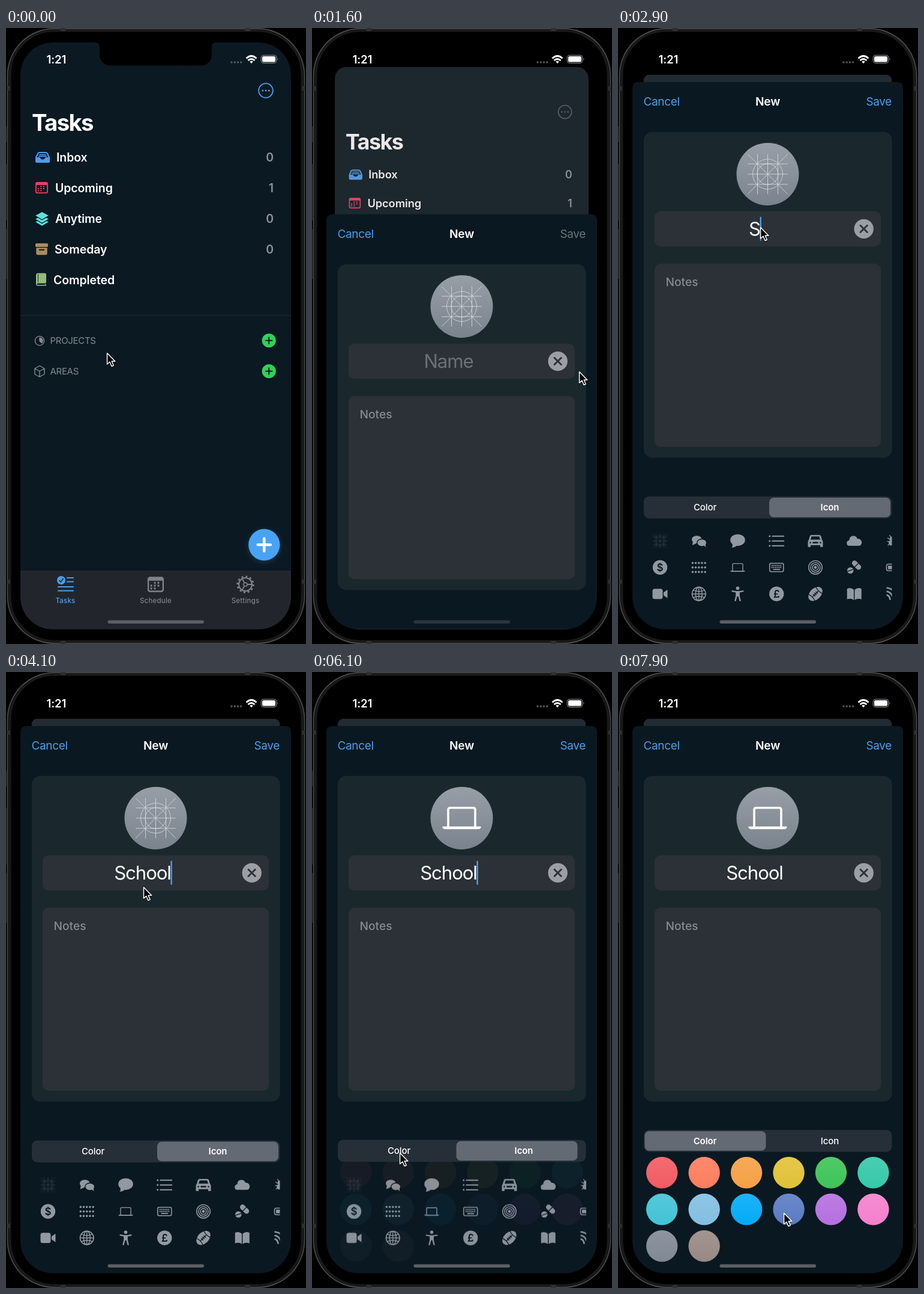
Animation of 500x1024 px, one loop 8 s. Source, as an HTML page:

```html
<!DOCTYPE html>
<html lang="en">
<head>
<meta charset="utf-8">
<title>New list</title>
<style>
html, body { margin: 0; width: 100%; height: 100%; overflow: hidden; background: #000; }
svg { display: block; width: 100vw; height: 100vh; }
text { font-family: Inter, "Open Sans", sans-serif; }
.row { font: 600 19.5px Inter, sans-serif; fill: #fff; letter-spacing: -.1px; }
.num { font: 600 19.5px Inter, sans-serif; fill: #8b9399; text-anchor: end; }
.cap { font: 400 15px Inter, sans-serif; fill: #858c91; letter-spacing: -.3px; }
.tab { font: 500 11.5px Inter, sans-serif; fill: #7d8185; text-anchor: middle; letter-spacing: .2px; }
.nav { font: 400 19px Inter, sans-serif; fill: #4a9fec; letter-spacing: -.35px; }
.name { font: 400 31.2px Inter, sans-serif; text-anchor: middle; letter-spacing: -1.1px; }
.seg { font: 500 15px Inter, sans-serif; fill: #fff; text-anchor: middle; letter-spacing: -.1px; }
.line { fill: none; stroke: currentColor; stroke-linecap: round; stroke-linejoin: round; }
</style>
</head>
<body>
<svg viewBox="0 0 500 1024" preserveAspectRatio="none">
<defs>
  <clipPath id="screen"><rect x="24" y="24" width="451" height="975.5" rx="54"/></clipPath>
  <clipPath id="cardClip"><rect id="cardRect" x="24" y="24" width="451" height="976"/></clipPath>
  <clipPath id="gridClip"><rect x="43" y="825" width="413.5" height="140"/></clipPath>
  <linearGradient id="silver" x2="0" y2="1"><stop stop-color="#979ea7"/><stop offset="1" stop-color="#7a838d"/></linearGradient>
  <linearGradient id="shine" x2="0" y2="1"><stop stop-color="#fff" stop-opacity=".1"/><stop offset="1" stop-color="#fff" stop-opacity="0"/></linearGradient>
  <filter id="glow" x="-50%" y="-50%" width="200%" height="200%"><feDropShadow dx="0" dy="2" stdDeviation="4" flood-color="#4a9fec" flood-opacity=".25"/></filter>
  <filter id="shade" x="-50%" y="-50%" width="200%" height="200%"><feDropShadow dx="0" dy="1.5" stdDeviation="1.2" flood-opacity=".45"/></filter>
  <g id="grid" class="line"><path d="M-17-33V33M0-33V33M17-33V33M-33-17H33M-33 0H33M-33 17H33M-33-33L33 33M33-33L-33 33"/><circle r="25"/><circle r="17.5"/></g>
  <g id="laptop"><path class="line" d="M-22.5 15V-13Q-22.5-16.5-19-16.5H19Q22.5-16.5 22.5-13V15" stroke-width="3.6"/><path d="M-32 14.5H32V16Q31 19 28 19H-28Q-31 19-32 16Z" fill="currentColor"/></g>
  <g id="calendar">
    <rect x="-10.5" y="-9.5" width="21" height="19" rx="3.2" fill="currentColor"/>
    <path d="M-8.7-4.6H8.7V6Q8.7 7.7 7 7.7H-7Q-8.7 7.7-8.7 6Z" fill="var(--back)"/>
    <path d="M-2.2-2H7M-6.8 1.5H7M-6.8 5H2.4" stroke="currentColor" stroke-width="2.2" stroke-dasharray="2.2 2.4"/>
  </g>
  <g id="plus"><circle r="11.6" fill="#30d158"/><path d="M-5.3 0H5.3M0-5.300V5.300" stroke="#0b1922" stroke-width="2" stroke-linecap="round"/></g>
</defs>

<!-- phone body -->
<rect width="500" height="1024"/>
<rect x="6" y="4" width="488" height="1016" rx="74" fill="none" stroke="#191919" stroke-width="5"/>
<rect x="2.5" y="1" width="495" height="1022" rx="78" fill="none" stroke="#555" stroke-width="1.4"/>
<path d="M91 2.5H99M398 2.5H407M91 1021.5H99M398 1021.5H407M4 97V104M496 97V104M4 917V924M496 917V924" stroke="#303030" stroke-width="5"/>
<path d="M.5 164V190M.5 226V320M.5 334V417" stroke="#333"/>

<g clip-path="url(#screen)">
  <g id="card"><g clip-path="url(#cardClip)" style="--back:#0b1922">
    <rect x="24" y="24" width="451" height="976" fill="#0b1922"/>
    <g id="more"><circle cx="433" cy="104" r="11.8" fill="none" stroke="currentColor" stroke-width="1.8"/><path d="M427.7 104h.01M433 104h.01M438.3 104h.01" class="line" stroke-width="3"/></g>
    <text x="43" y="170.5" fill="#fff" style="font-weight:700;font-size:38.4px;letter-spacing:-1.7px">Tasks</text>
    <g transform="translate(61 215)" fill="#4a9fec">
      <path d="M-5.5-9H5.5Q7.5-9 8.6-7.3L12 0V6.5Q12 9 9.5 9H-9.5Q-12 9-12 6.5V0L-8.6-7.3Q-7.5-9-5.5-9Z"/>
      <path d="M-9.5 0L-6.6-6.4Q-6.2-7-5.5-7H5.5Q6.2-7 6.6-6.4L9.5 0H4.6Q3.6 3.4 0 3.4T-4.6 0Z" fill="#0b1922"/>
      <path d="M-5.8-4.4H5.8M-7-1.6H7" stroke="#4a9fec" stroke-width="1.7"/>
    </g>
    <use href="#calendar" x="59.5" y="265.5" color="#ea4060"/>
    <g transform="translate(60 317)" fill="#5fe0dd" stroke="#0b1922" stroke-width="1.3">
      <path id="leaf" d="M0-1L12 5.5L0 12.5L-12 5.5Z"/><use href="#leaf" y="-5"/><use href="#leaf" y="-10.7"/>
    </g>
    <g transform="translate(59.5 367.5)" fill="#aa8b62">
      <rect x="-10.5" y="-9.5" width="21" height="6" rx="1.5"/><path d="M-9.2-2.2H9.2V7Q9.2 9.8 6.5 9.8H-6.5Q-9.2 9.8-9.2 7Z"/>
      <path d="M-3.8 1.3H3.8" stroke="#0b1922" stroke-width="2" stroke-linecap="round"/>
    </g>
    <g transform="translate(58.5 418)">
      <path d="M-5-10.5H6.2Q8.5-10.5 8.5-8.2V5.2H7.4V8.5H8.5V10.5H-5.5Q-8.5 10.5-8.5 7.5V-7Q-8.5-10.5-5-10.5Z" fill="#94bb7c"/>
      <path d="M-5-9V4.5M6.5 6.9H-5Q-6.8 6.9-6.8 7.7T-5 8.5H6.5Z" fill="#0b1922" stroke="#0b1922" stroke-width=".9"/>
    </g>
    <text class="row" x="84" y="222">Inbox</text><text class="row" x="82" y="273">Upcoming</text><text class="row" x="82" y="324">Anytime</text><text class="row" x="81" y="375">Someday</text><text class="row" x="79" y="426">Completed</text>
    <text class="num" x="446" y="222">0</text><text class="num" x="446" y="273">1</text><text class="num" x="446" y="324">0</text><text class="num" x="446" y="375">0</text>
    <path d="M24 478H475" stroke="#202d35"/>
    <g color="#858c91" class="line" stroke-width="1.4">
      <circle cx="56" cy="520" r="7.6"/><path d="M56 515V520L59.5 523.6A5 5 0 0 0 56 515Z" fill="currentColor"/>
      <path d="M56 561.5L64 566V575.5L56 580L48 575.5V566ZM48 566L56 570.5L64 566M56 570.5V580"/>
    </g>
    <text class="cap" x="73.5" y="525.3">PROJECTS</text><text class="cap" x="73.5" y="576.3">AREAS</text>
    <use href="#plus" x="438.2" y="519.5"/><use href="#plus" x="438.2" y="570.5"/>
    <circle cx="430.3" cy="859" r="26.2" fill="#4aa3f4" filter="url(#glow)"/>
    <path d="M419.8 859H440.8M430.3 848.5V869.5" stroke="#fff" stroke-width="4.6" stroke-linecap="round"/>
    <path d="M24 903H475V1000H24Z" fill="#22262c"/><path d="M24 903H475" stroke="#2d3137"/>
    <g color="#4a9fec"><circle cx="92" cy="918" r="7" fill="currentColor"/><path class="line" stroke-width="2.2" d="M102 914H112M102 920.5H112M87 929H112M87 935.5H112"/><path class="line" stroke-width="1.6" d="M89 918.5L91.3 921L95.2 915.3" style="stroke:#22262c"/></g>
    <g color="#808488" style="--back:#22262c"><use href="#calendar" transform="translate(249.5 925) scale(1.29 1.34)"/>
      <g transform="translate(399 925)" class="line"><circle r="11" stroke-width="2"/><circle r="13.3" stroke-width="2.6" stroke-dasharray="3 3.96" style="stroke-linecap:butt"/><circle r="3" stroke-width="1.5"/><path d="M3 0H10.5M-1.5-2.6L-5.3-9.1M-1.5 2.6L-5.3 9.1" stroke-width="1.8"/></g></g>
    <text class="tab" x="99" y="955.5" style="fill:#4a9fec">Tasks</text><text class="tab" x="249.5" y="955.5">Schedule</text><text class="tab" x="399" y="955.5">Settings</text>
    <rect id="dim" x="24" y="24" width="451" height="976" fill="#7a6e6c"/>
  </g></g>

  <g id="sheet">
    <path d="M24 1010V100Q24 90 34 90H465Q475 90 475 100V1010Z" fill="#0a1821"/>
    <text class="nav" x="42.5" y="129">Cancel</text>
    <text x="249.5" y="129" fill="#fff" text-anchor="middle" style="font-weight:600;font-size:19.2px;letter-spacing:-.2px">New</text>
    <text class="nav" id="save" x="456" y="129" text-anchor="end">Save</text>
    <rect x="43" y="173" width="413.5" height="541.5" rx="14" fill="#1a282e"/>
    <circle cx="249.5" cy="243.2" r="52" fill="url(#silver)"/>
    <use href="#grid" id="bigGrid" x="249.5" y="243.2" color="#d8dde1" stroke-width=".8"/>
    <use href="#laptop" id="bigLaptop" x="249.5" y="242.5" color="#fff"/>
    <rect x="61" y="305" width="377" height="58.5" rx="10" fill="#2b3137"/>
    <text class="name" id="hint" x="227.5" y="345.5" fill="#6c7176">Name</text>
    <text class="name" id="typed" x="227.5" y="345.5" fill="#fff"></text>
    <rect id="caret" y="314" width="2.4" height="40" rx="1" fill="#4a9fec"/>
    <circle cx="409.7" cy="334.2" r="16.2" fill="#9b9fa4"/><path d="M404 328.5L415.4 339.9M415.4 328.5L404 339.9" stroke="#2b3137" stroke-width="2.8" stroke-linecap="round"/>
    <rect x="61" y="392" width="377" height="304.5" rx="10" fill="#2b3137"/>
    <text x="79.5" y="429" fill="#868a8e" style="font-weight:500;font-size:19.2px">Notes</text>
    <g id="icons" clip-path="url(#gridClip)" color="#9198a0"></g>
    <g id="colors"></g>
    <g id="segment">
      <rect x="43" y="779" width="413.5" height="36.5" rx="9" fill="#262f38"/>
      <rect id="thumb" y="781" width="202" height="32.5" rx="7.5" fill="#646a73"/>
      <text class="seg" id="segColor" x="145" y="802.5">Color</text><text class="seg" id="segIcon" x="353" y="802.5">Icon</text>
    </g>
  </g>
  <path d="M148 24H351Q343 24 343 32V42Q343 62.5 322.5 62.5H176.5Q156 62.5 156 42V32Q156 24 148 24Z"/>
  <rect id="home" x="169.5" y="984.5" width="160.5" height="5.5" rx="2.75" fill="#5b5f63"/>
  <text x="67.5" y="58.7" fill="#fff" style="font-weight:600;font-size:18.7px;letter-spacing:-.2px">1:21</text>
  <path d="M376 57h.01M381.3 57h.01M386.5 57h.01M391.7 57h.01" class="line" color="#50575c" stroke-width="3.6"/>
  <g class="line" color="#fff" stroke-width="2.8" style="stroke-linecap:butt"><path d="M400.5 50.5Q409 42.5 417.5 50.5M403.5 54Q409 49 414.5 54"/><path d="M406.3 56Q409 53.7 411.7 56L409 59Z" fill="#fff" stroke-width="0"/></g>
  <rect x="425.3" y="45.3" width="25.5" height="13" rx="4" fill="none" stroke="#7d848a" stroke-width="1.2"/><rect x="427" y="47" width="22" height="9.6" rx="2.6" fill="#fff"/><path d="M452.5 49.8Q454.5 51.8 452.5 53.8Z" fill="#7d848a"/>
</g>
<g id="pointer"><path d="M.6.5V18.8L5 15L8.1 22.3L11.2 21L8.2 14H13.8Z" stroke="#fff" stroke-width="1.4" stroke-linejoin="round" filter="url(#shade)"/></g>
</svg>

<script>
const $ = id => document.getElementById(id);
const set = (id, attrs) => { for (const k in attrs) $(id).setAttribute(k, attrs[k]); };
const clamp = v => Math.max(0, Math.min(1, v));
const ease = v => (v = clamp(v), v * v * (3 - 2 * v));
const mix = (a, b, p) => a + (b - a) * p;

const bg = '#0a1821', ink = 'currentColor';
const fill = (d, c = ink) => `<path d="${d}" fill="${c}"/>`;
const line = (d, w = 1.6, c = ink) => `<path class="line" d="${d}" stroke-width="${w}" style="stroke:${c}"/>`;
const disc = (x, y, r, c = ink) => `<circle cx="${x}" cy="${y}" r="${r}" fill="${c}"/>`;
const ring = (r, w = 1.6) => `<circle class="line" r="${r}" stroke-width="${w}"/>`;
const oval = (x, y, rx, ry) => `<ellipse cx="${x}" cy="${y}" rx="${rx}" ry="${ry}" fill="${ink}" stroke="${bg}" stroke-width="1.4"/>`;
const coin = s => disc(0, 0, 12.2) + `<text y="6" text-anchor="middle" font-size="17" font-weight="600" fill="${bg}">${s}</text>`;
const dots = y => `<path class="line" d="M-10.4 ${y}H10.5" stroke-width="3.6" stroke-dasharray="0 5.2"/>`;

const icons = [
  '<use href="#grid" transform="scale(.38)" stroke-width="1.3" opacity=".36"/>',
  oval(-3.5, -2.5, 9, 7) + fill('M-10 1L-11 7L-4 4Z') + oval(5, 3, 8, 6.2) + fill('M8 7L11.5 10.5L11 4Z'),
  oval(0, -1.5, 13, 10.5) + fill('M-9 4Q-8 9-10 11Q-4 11-1 7Z'),
  line('M-7-8H12M-7 0H12M-7 8H12', 2) + line('M-11.5-8h.01M-11.5 0h.01M-11.5 8h.01', 3),
  fill('M-6.5-10H6.5Q8.5-10 9.2-8L11-2Q12.5-.5 12.5 1.5V10H8V7H-8V10H-12.5V1.5Q-12.5-.5-11-2L-9.2-8Q-8.5-10-6.5-10Z') + fill('M-6.3-7.5H6.3L8-2.3H-8Z', bg) + line('M-8.5 2.8h.01M8.5 2.8h.01M-3.5 2.8H3.5', 2.6, bg),
  fill('M-8 8Q-12.5 8-12.5 3.5Q-12.5-.5-8.5-1Q-8-8.5-1.5-8.5Q3.5-8.5 5-4Q11.500-4 12.5 2Q12.5 8 7 8Z'),
  disc(-2.5, -4, 3.2) + disc(-3, 3, 4.5) + line('M-9-5L-5-2M-9.5 1H-5M-8.5 7L-5 4', 1.3) + line('M-6-9.5L-3.5-6', 1.2),
  coin('$'),
  dots(-7.5) + dots(0) + dots(7.5),
  '<use href="#laptop" transform="scale(.38)"/>',
  '<rect class="line" x="-11.5" y="-7" width="23" height="14" rx="2.5" stroke-width="1.6"/>' + `<path d="M-8.5-3.2H8.5M-8.5 0H8.5" stroke="${ink}" stroke-width="1.9" stroke-dasharray="1.9 1"/>` + line('M-5 3.5H5', 1.8),
  ring(11.2) + ring(8) + ring(4.8) + disc(0, 0, 2.4),
  `<g transform="rotate(45 4 -4)"><rect x="-5" y="-8" width="18" height="8.5" rx="4.25" fill="${ink}"/></g>` + line('M1-1L7-7', 1.3, bg) + oval(-6.5, 5, 6, 6) + line('M-11 6.5L-2 3.5', 1.3, bg),
  '<rect class="line" x="-11" y="-5.5" width="22" height="11" rx="3" stroke-width="1.6"/>' + fill('M-8.5-3H8V3H-8.5Z'),
  `<rect x="-12.5" y="-8.5" width="17" height="17" rx="3.5" fill="${ink}"/>` + fill('M6-2.5L12.5-7V7L6 2.5Z'),
  ring(11.3) + '<ellipse class="line" rx="5.5" ry="11.3" stroke-width="1.5"/>' + line('M0-11V11M-11 0H11M-9-6Q0-2 9-6M-9 6Q0 2 9 6', 1.4),
  disc(0, -9.5, 2.8) + line('M-9-4.5L-3-3.5H3L9-4.5', 2.2) + line('M-2-3V3L-4 11M2-3V3L4 11', 2.4) + fill('M-3-4H3V4H-3Z'),
  coin('£'),
  '<g transform="rotate(-45)">' + oval(0, 0, 14.5, 10) + line('M-6 0H6M-3-2V2M0-2V2M3-2V2M-8.5-7Q-6 0-8.5 7M8.5-7Q6 0 8.5 7', 1.3, bg) + '</g>',
  fill('M-.7-7Q-6-11.5-12-8.5V9Q-6 6.5-.7 10Z') + fill('M.7-7Q6-11.5 12-8.5V9Q6 6.5 .7 10Z'),
  line('M-10-10Q0-9 4 0M-10-4Q-4-3-1 4M-10 2Q-6 3-5 9', 2.6)
];
$('icons').innerHTML = icons.map((s, i) =>
  `<g transform="translate(${70 + 64.75 * (i % 7)} ${853 + 44 * Math.floor(i / 7)})">${s}</g>`).join('');

const palette = ['#f25b62', '#fd7d5e', '#f6a046', '#e2c138', '#3ec457', '#36c8aa', '#42c3d6',
  '#82bfe2', '#04abf8', '#5a7bc4', '#b570df', '#f580cc', '#808994', '#988984'];
$('colors').innerHTML = palette.map((c, i) => {
  const at = `cx="${73.2 + 70.45 * (i % 6)}" cy="${832.5 + 61 * Math.floor(i / 6)}" r="26.2"`;
  return `<circle ${at} fill="${c}"/><circle ${at} fill="url(#shine)"/>`;
}).join('');

// pointer stops: time, x, y
const path = [[0, 168, 540], [500, 232, 556], [1250, 445, 571], [1620, 445, 571], [1800, 328, 479],
  [2300, 242, 338], [2600, 237, 331], [4020, 237, 331], [4450, 148, 700], [4900, 170, 903],
  [5120, 193, 908], [5330, 193, 908], [5900, 150, 797], [6100, 146, 799], [6500, 137, 881],
  [7000, 172, 882], [7900, 276, 899], [8000, 282, 901]];

// cubic through the stops, standing still between equal ones
function slope(i, k) {
  const a = path[i - 1], b = path[i], c = path[i + 1];
  if (!a || !c || (b[k] - a[k]) * (c[k] - b[k]) <= 0) return 0;
  const v = (b[k] - a[k]) / (b[0] - a[0]), w = (c[k] - b[k]) / (c[0] - b[0]);
  return 2 * v * w / (v + w);
}
function pointerAt(t) {
  const i = path.findIndex(p => p[0] > t) - 1;
  const a = path[i], b = path[i + 1], d = b[0] - a[0], u = (t - a[0]) / d, v = 1 - u;
  return [1, 2].map(k => v * v * (1 + 2 * u) * a[k] + u * u * (3 - 2 * u) * b[k]
    + d * u * v * (v * slope(i, k) - u * slope(i + 1, k)));
}

const keys = [2900, 3100, 3300, 3600, 3700, 3900];
const caretAlpha = t => {
  if (t < 2500) return 0;
  if (t < 4550) return 1;
  const u = (t - 4550) % 1000;
  return u < 500 ? 1 - clamp(u / 100) : clamp((u - 400) / 100);
};

function draw(t) {
  // critically damped spring raises the sheet
  const s = Math.max(0, t - 1450) * Math.sqrt(1000 / 3) / 1000;
  const left = (1 + s) * Math.exp(-s), up = 1 - left;
  const scale = 1 - .082 * up;
  set('card', { transform: `translate(${249.5 * (1 - scale)} ${24 + 53.5 * up - 24 * scale}) scale(${scale})` });
  set('cardRect', { rx: mix(53, 11, up) });
  set('dim', { opacity: .21 * up });
  const dull = ease((t - 1450) / 150);
  set('more', { color: `rgb(${mix(74, 80, dull)},${mix(159, 88, dull)},${mix(236, 92, dull)})` });
  set('sheet', { transform: `translate(0 ${910 * left - .3})`, visibility: s ? 'visible' : 'hidden' });
  set('home', { opacity: 1 - .6 * Math.sin(Math.PI * clamp((t - 1450) / 350)) });

  const text = 'School'.slice(0, keys.filter(k => k <= t).length);
  $('typed').textContent = text;
  set('hint', { opacity: text ? 0 : 1 });
  $('save').style.fill = text ? '#4a9fec' : '#6b747a';
  const w = text ? $('typed').getComputedTextLength() / 2 : -42;
  set('caret', { x: 227.5 + w - .4, opacity: caretAlpha(t) });

  const picked = t >= 5100;
  set('bigGrid', { opacity: picked ? 0 : 1 });
  set('bigLaptop', { opacity: picked ? 1 : 0 });

  const p = ease((t - 6050) / 350);
  set('segment', { transform: `translate(0 ${-17.5 * p})` });
  set('thumb', { x: mix(252, 44.5, p) });
  set('icons', { opacity: 1 - p });
  set('colors', { opacity: p });
  $('segColor').style.fontWeight = p > .5 ? 600 : 500;
  $('segIcon').style.fontWeight = p > .5 ? 500 : 600;

  const [x, y] = pointerAt(t);
  set('pointer', { transform: `translate(${x} ${y})`, opacity: t >= 3100 && t < 4100 ? 0 : 1 });
}

const start = performance.now();
function tick(now) {
  const t = Math.max(0, now - start) % 8000;
  draw(Math.floor(t / 100) * 100);
  requestAnimationFrame(tick);
}
draw(0);
requestAnimationFrame(tick);
</script>
</body>
</html>
```
